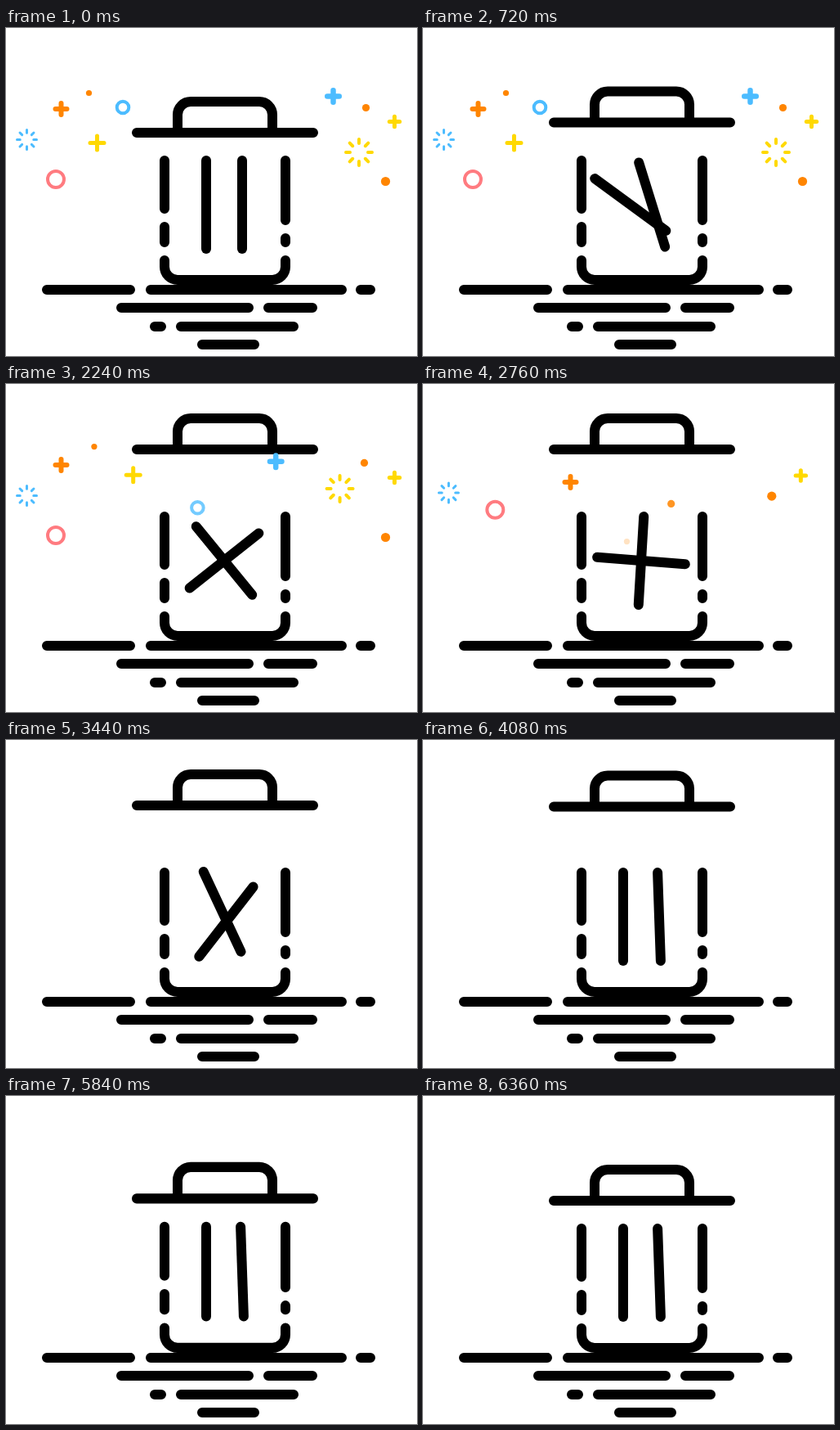
An HTML page that plays this animation: 503 by 401 pixels, repeating every 7200 ms.

```html
<!DOCTYPE html>
<html>
<head>
<meta charset="utf-8">
<title>Trash can</title>
<style>
  html, body { margin: 0; width: 100%; height: 100%; overflow: hidden; background: #fff; }
  svg { display: block; width: 503px; height: 401px; }
  path { fill: none; stroke-linecap: round; stroke-linejoin: round; }
  .ink { stroke: #000; stroke-width: 12; }
</style>
</head>
<body>
<svg viewBox="0 0 503 401">
  <path class="ink" d="M50 320H152M177 320H411M434 320H446M141 342H297M321 342H375M182 365H190M214 365H352M240 387H304"/>
  <g id="can">
    <path class="ink" d="M194 162V221M194 243V262M342 162V235M342 257V262M194 284V292A16 16 0 0 0 210 308H326A16 16 0 0 0 342 292V284"/>
    <path class="ink" id="lid" d="M160 128H376M210 128V106A16 16 0 0 1 226 90H310A16 16 0 0 1 326 106V128"/>
    <path class="ink" id="left" d="M0 -54V54"/>
    <path class="ink" id="right" d="M0 -54V54"/>
  </g>
  <g id="bits"></g>
</svg>
<script>
const LOOP = 7200;
const FLIGHT = 680;
const DROP = { x: 260, y: 215 };
const ORANGE = '#ff8500', BLUE = '#4cbcff', YELLOW = '#ffd900', PINK = '#ff7b80';
const $ = id => document.getElementById(id);

// kind, x, y, radius, stroke, colour, take-off time, height of the curve's control point
const bits = [
  ['ring', 143, 97, 7.3, 4, BLUE, 1640, 45],
  ['plus', 400.5, 83.5, 10.5, 6.5, BLUE, 1760, 40],
  ['plus', 111.5, 140.5, 11, 5, YELLOW, 1870, 55],
  ['burst', 432, 152, 18, 4, YELLOW, 1990, 45],
  ['dot', 101.5, 79.5, 3.6, 0, ORANGE, 2104, 39],
  ['dot', 440.5, 97.5, 4.6, 0, ORANGE, 2169, 47],
  ['plus', 67.5, 99, 10, 6, ORANGE, 2240, 60],
  ['dot', 464.5, 187.5, 5.6, 0, ORANGE, 2469, 17],
  ['ring', 61, 185, 10, 4, PINK, 2509, 51],
  ['plus', 475.5, 114.5, 8.7, 5, YELLOW, 2593, 90],
  ['burst', 25.5, 136.5, 13.5, 3, BLUE, 2653, 66]
].map(([kind, x, y, r, stroke, color, start, peak]) => {
  const el = document.createElementNS('http://www.w3.org/2000/svg', 'path');
  el.setAttribute('d', shape(kind, r, stroke));
  if (kind === 'dot') el.style.fill = color;
  else {
    el.style.stroke = color;
    el.style.strokeWidth = stroke;
  }
  $('bits').append(el);
  return { el, x, y, start, peak };
});

function shape(kind, r, stroke) {
  if (kind === 'plus') {
    const a = r - stroke / 2;
    return `M${-a} 0H${a}M0 ${-a}V${a}`;
  }
  if (kind === 'burst') {
    let d = '';
    for (let i = 0; i < 8; i++) {
      const c = Math.cos(i * Math.PI / 4), s = Math.sin(i * Math.PI / 4);
      const a = r * 0.5 + stroke / 2, b = r - stroke / 2;
      d += `M${a * c} ${a * s}L${b * c} ${b * s}`;
    }
    return d;
  }
  return `M${-r} 0A${r} ${r} 0 1 1 ${r} 0A${r} ${r} 0 1 1 ${-r} 0Z`;
}

const clamp = v => Math.min(1, Math.max(0, v));
const span = (t, from, to) => clamp((t - from) / (to - from));
const mix = (a, b, p) => a + (b - a) * p;
const easeInOut = p => p < 0.5 ? 4 * p ** 3 : 1 - 4 * (1 - p) ** 3;

function track(t, steps) {
  const next = steps.findIndex(step => step[0] > t);
  if (next === 0) return steps[0][1];
  if (next < 0) return steps[steps.length - 1][1];
  const [t0, a] = steps[next - 1], [t1, b] = steps[next];
  return mix(a, b, (t - t0) / (t1 - t0));
}

const SPIN = [[1600, 0], [2760, 497], [3440, 788], [4000, 1080]];
const GAP = [[400, 22], [1200, 0], [3200, 0], [4000, 22]];
const LEFT_TURN = [[400, 0], [1200, -134], [3200, -134], [4000, 0]];
const RIGHT_TURN = [[400, 0], [1200, -43], [3200, -43], [4000, -2]];

function drawBars(t) {
  const spin = track(t, SPIN), gap = track(t, GAP);
  const place = (id, dx, turn) => $(id).setAttribute('transform',
    `translate(267 216) rotate(${spin}) translate(${dx} 0) rotate(${turn})`);
  place('left', -gap, track(t, LEFT_TURN));
  place('right', gap, track(t, RIGHT_TURN));
}

function drawCan(t) {
  const lift = easeInOut(span(t, 400, 1200)) - easeInOut(span(t, 4000, 4400));
  $('lid').setAttribute('transform', `translate(0 ${-48 * lift})`);
  const squeeze = 1 - 0.12 * Math.sin(Math.PI * span(t, 4800, 5700));
  const stretch = 1 + 0.061 * Math.sin(Math.PI * span(t, 5800, 6360));
  $('can').setAttribute('transform',
    `translate(268 314) scale(${squeeze} ${stretch}) translate(-268 -314)`);
}

function drawBits(t) {
  for (const { el, x, y, start, peak } of bits) {
    const u = span(t, start, start + FLIGHT) ** 2;
    const px = mix(x, DROP.x, u);
    const py = mix(mix(y, peak, u), mix(peak, DROP.y, u), u);
    el.setAttribute('transform', `translate(${px} ${py})`);
    el.setAttribute('opacity', clamp((1 - u) / 0.28));
  }
}

function frame() {
  const t = performance.now() % LOOP;
  drawCan(t);
  drawBars(t);
  drawBits(t);
  requestAnimationFrame(frame);
}
frame();
</script>
</body>
</html>
```
